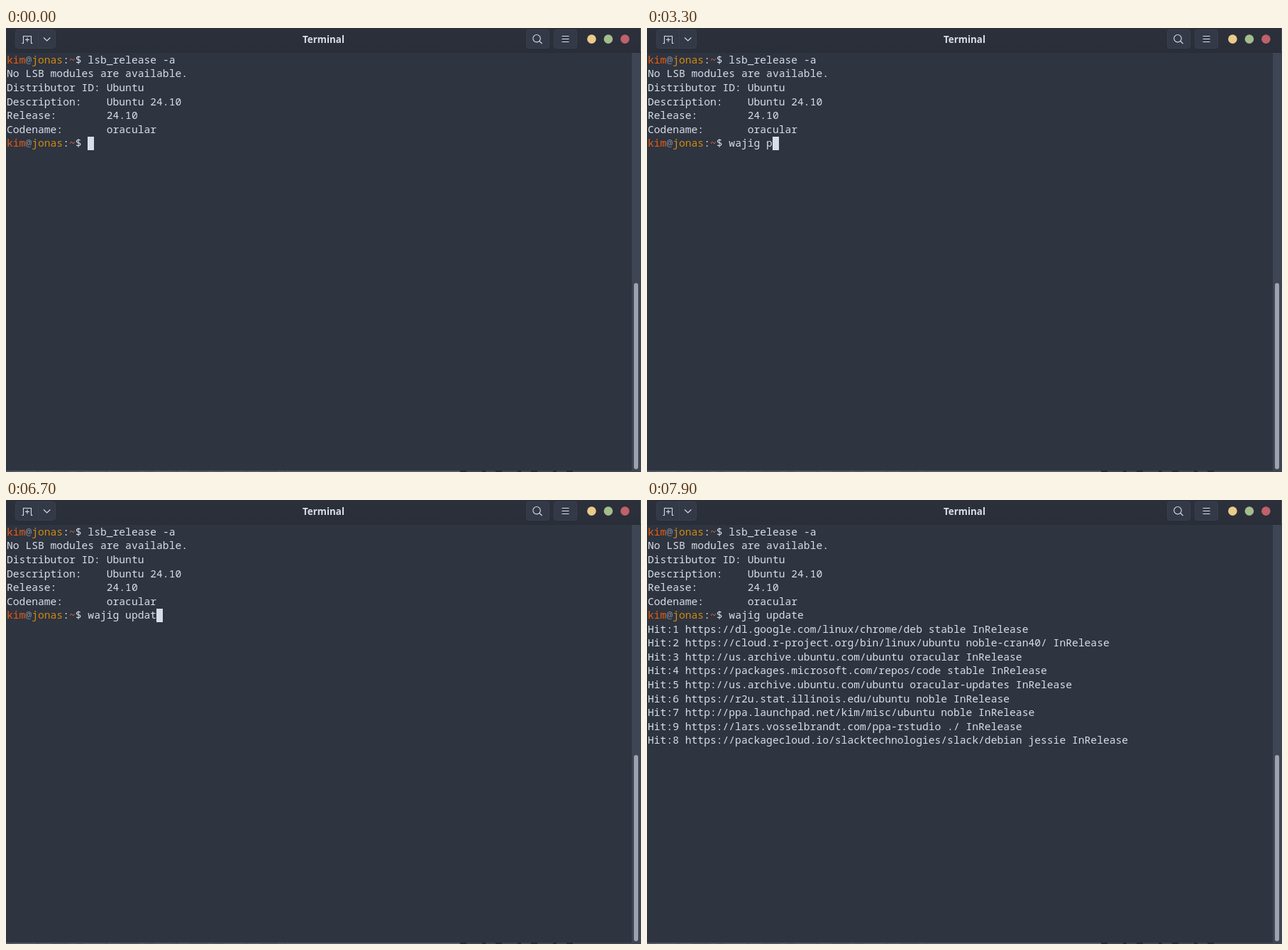
Recreate the animation shown at these times as an HTML page. Size 895x625 px, loop 8 s.

```html
<!DOCTYPE html>
<html lang="en">
<head>
<meta charset="utf-8">
<title>Terminal</title>
<style>
  html, body { margin: 0; width: 100%; height: 100%; overflow: hidden; background: #2e3440; }
  #stage { position: relative; width: 895px; height: 625px; overflow: hidden; }
  svg, pre, #cursor { position: absolute; }
  svg { left: 0; top: 0; }
  pre {
    left: 1px; top: 34.85px; margin: 0; color: #d8dee9;
    font: 14.6667px/19.57px "Noto Sans Mono", monospace;
    font-variant-ligatures: none;
  }
  .user { color: #e95b0c; }
  .at { color: #7b8494; }
  .host { color: #d08a0e; }
  .path { color: #d0643c; }
  .progress { color: #ebcb8b; }
  #cursor { width: 8.8px; height: 19.57px; background: #d8dee9; }
</style>
</head>
<body>
<div id="stage">
  <svg width="895" height="625">
    <defs>
      <linearGradient id="bar" x2="0" y2="1">
        <stop stop-color="#2b303b"/><stop offset="1" stop-color="#292e39"/>
      </linearGradient>
    </defs>
    <rect width="895" height="34" fill="url(#bar)"/>
    <rect y="34" width="895" height="1" fill="#282d37"/>
    <rect x="894" width="1" height="34" fill="#4b505c"/>
    <g fill="#333947" stroke="#393f4d">
      <rect x="13.5" y="2.5" width="56" height="26" rx="3"/>
      <path d="M45.500 3V28"/>
      <rect x="733.5" y="2.5" width="32" height="26" rx="3"/>
      <rect x="772.5" y="2.5" width="32" height="26" rx="3"/>
    </g>
    <g fill="none" stroke="#d8dee9" stroke-width="1.1">
      <path d="M22.500 21.500H24.500V11.500H35.500V21.500H37.500M30 13.500V19.500M27 16.500H33"/>
      <path d="M53 13.500L57.700 18L62.400 13.500"/>
      <circle cx="748" cy="14.700" r="5.200"/>
      <path d="M751.800 18.500L755.500 22M783.500 11.500H793.500M783.500 15.500H793.500M783.500 19.500H793.500"/>
    </g>
    <text x="447.500" y="20.500" text-anchor="middle" fill="#d8dee9"
      font-family="Noto Sans, sans-serif" font-weight="700" font-size="13.400">Terminal</text>
    <circle cx="825.400" cy="15.600" r="6.300" fill="#ebcb8b"/>
    <circle cx="848.900" cy="15.600" r="6.300" fill="#a3be8c"/>
    <circle cx="872.400" cy="15.600" r="6.300" fill="#bf616a"/>
    <rect x="882" y="35" width="13" height="588" fill="#3e4555"/>
    <rect x="885" y="359" width="6" height="262" rx="3" fill="#9da2ad"/>
    <rect y="623" width="895" height="2" fill="#555a64"/>
    <path d="M640 624H895" stroke="#41464f" stroke-width="2"/>
    <path d="M0 624.500H395" stroke="#4a4f59" stroke-dasharray="12 30 4 18 25 9"/>
    <path d="M640 624H800" stroke="#272b33" stroke-width="2" stroke-dasharray="9 22 5 14"/>
  </svg>
  <pre id="screen"></pre>
  <div id="cursor"></div>
</div>
<script>
const LOOP = 8000, COLUMN = 8.8, ROW = 19.57, PROMPT_ROW = 6, PROMPT_LENGTH = 13;
const screen = document.getElementById("screen");
const cursor = document.getElementById("cursor");

const prompt = '<span class="user">kim</span><span class="at">@</span>' +
  '<span class="host">jonas</span>:<span class="path">~</span>$ ';
const intro = `${prompt}lsb_release -a
No LSB modules are available.
Distributor ID: Ubuntu
Description:    Ubuntu 24.10
Release:        24.10
Codename:       oracular
${prompt}`;

const hits = [
  "1 https://dl.google.com/linux/chrome/deb stable",
  "2 https://cloud.r-project.org/bin/linux/ubuntu noble-cran40/",
  "3 http://us.archive.ubuntu.com/ubuntu oracular",
  "4 https://packages.microsoft.com/repos/code stable",
  "5 http://us.archive.ubuntu.com/ubuntu oracular-updates",
  "6 https://r2u.stat.illinois.edu/ubuntu noble",
  "7 http://ppa.launchpad.net/kim/misc/ubuntu noble",
  "9 https://lars.vosselbrandt.com/ppa-rstudio ./",
  "8 https://packagecloud.io/slacktechnologies/slack/debian jessie"
].map(hit => `Hit:${hit} InRelease`);

// [start time, command typed so far]
const typing = [
  [0, ""], [700, "w"], [900, "wa"], [1100, "waj"], [1300, "wajg"], [1700, "wajgi"],
  [2000, "wajg"], [2200, "waj"], [2400, "waji"], [2700, "wajig"],
  [3100, "wajig "], [3300, "wajig p"], [3600, "wajig pu"], [3900, "wajig p"], [4000, "wajig "],
  [4700, "wajig u"], [4900, "wajig up"], [5300, "wajig upd"],
  [5600, "wajig upda"], [5800, "wajig updaet"], [5900, "wajig updaete"],
  [6300, "wajig updaet"], [6400, "wajig updae"], [6500, "wajig upda"],
  [6700, "wajig updat"], [6900, "wajig update"]
];

// [start time, finished lines, progress line]; null hides progress and cursor
const waiting = "[Waiting for headers]";
const output = [
  [7100, 0, ""],
  [7300, 0, "0% [Working]"],
  [7400, 3, `0% ${waiting} ${waiting} [Connecting to lars.vosselbrandt.com] [Connected to `],
  [7500, 5, `0% ${waiting} [Connecting to lars.vosselbrandt.com] ${waiting}`],
  [7600, 7, `0% ${waiting} [Connected to lars.vosselbrandt.com] ${waiting}`],
  [7800, 9, "0% [Working]"],
  [7900, 9, null]
];

const current = (steps, time) => steps.findLast(([start]) => start <= time);

function placeCursor(column, row, visible) {
  cursor.style.display = visible ? "block" : "none";
  cursor.style.left = 1 + column * COLUMN + "px";
  cursor.style.top = 35.4 + row * ROW + "px";
}

let shown;
function draw(now) {
  const time = now % LOOP;
  const command = current(typing, time)[1];
  const [, count, progress] = current(output, time) || [];
  const running = count !== undefined;
  let html = intro + command;

  if (running) {
    html += "\n" + hits.slice(0, count).map(line => line + "\n").join("");
    html += `<span class="progress">${progress ?? ""}</span>`;
    placeCursor((progress ?? "").length, PROMPT_ROW + 1 + count, progress !== null);
  } else {
    placeCursor(PROMPT_LENGTH + command.length, PROMPT_ROW, time < 200 || time >= 700);
  }
  if (html !== shown) screen.innerHTML = shown = html;
}

const begin = performance.now();
function tick() {
  draw(performance.now() - begin);
  requestAnimationFrame(tick);
}
tick();
</script>
</body>
</html>
```
